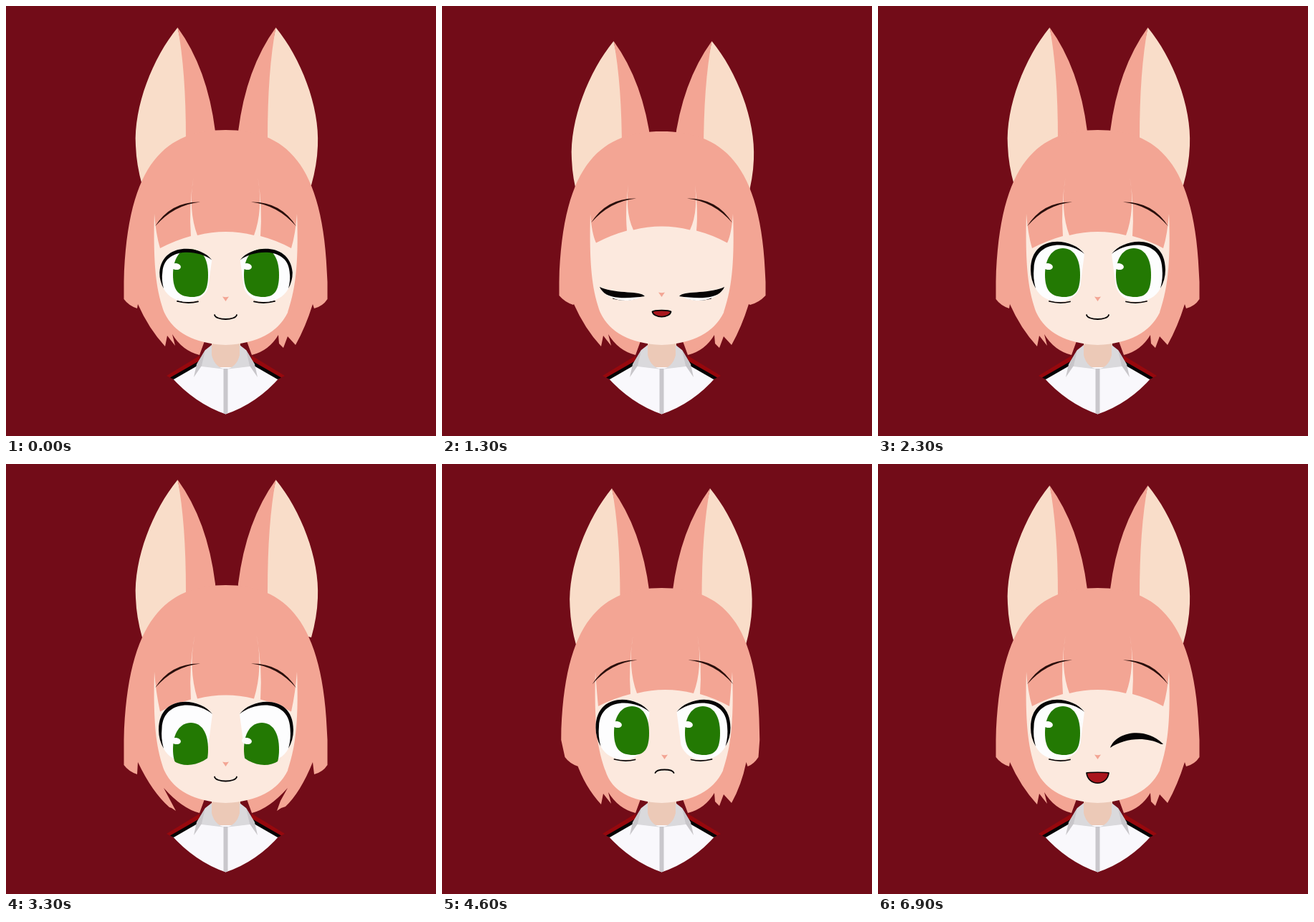
Recreate the animation shown at these times as an HTML page with a canvas. Size 600x600 px, loop 7000 ms.

```html
<!DOCTYPE html>
<html lang="en">
<head>
<meta charset="utf-8">
<title>Eared girl</title>
<style>
html, body { margin: 0; width: 100%; height: 100%; overflow: hidden; background: #720c18; }
canvas { display: block; width: 600px; height: 600px; }
</style>
</head>
<body>
<canvas id="stage" width="600" height="600"></canvas>
<script>
const g = document.getElementById('stage').getContext('2d');
const LOOP = 7000, STEP = 100;
const HAIR = '#f3a594', CREAM = '#f9ddc9', SKIN = '#fce9de', WHITE = '#fdfdfe', BLACK = '#050304';

const mix = (a, b, k) => a + (b - a) * k;
const fill = (d, color) => { g.fillStyle = color; g.fill(new Path2D(d)); };
const line = (d, width, color = BLACK) => {
  g.strokeStyle = color;
  g.lineWidth = width;
  g.lineCap = g.lineJoin = 'round';
  g.stroke(new Path2D(d));
};
const group = draw => { g.save(); draw(); g.restore(); };
const mirror = axis => { g.translate(axis * 2, 0); g.scale(-1, 1); };

// Upper lash outline (start, outer curve, tail, inner curve), then the lower edge of the white
const OPEN = [288,346, 270,322, 213,318, 213,368, 213,382, 220,394, 216,380, 217.5,366,
  219,325, 268,328, 232,418, 272,420, 282,392];
const SHUT = [283,408, 277,400, 245,405, 222,396, 221,395, 220,395, 221,398, 224,401,
  234,413, 262,411, 234,417, 262,418, 280,408];
const WINK = [290,396, 282,374, 242,366, 217,390, 217,390, 216,391, 218,391, 219,391,
  243,379, 272,384, 245,383, 270,385, 290,396];

function pose(t) {
  const ramp = (a, b) => {
    const x = Math.min(1, Math.max(0, (t - a) / (b - a)));
    return x * x * (3 - 2 * x);
  };
  const hold = (a, b, c, d) => ramp(a, b) - ramp(c, d);
  const during = (a, b, f) => t >= a && t < b ? f((t - a) / (b - a)) : 0;
  return {
    pitch: hold(2300, 2800, 3300, 3700) - 2 * hold(1100, 1500, 1900, 2300),
    turn: during(3700, 4900, x => -Math.sin(2 * Math.PI * x)),
    flick: during(0, 1000, x => Math.sin(2 * Math.PI * x) ** 2)
      + during(5100, 5900, x => Math.sin(Math.PI * x) ** 2),
    shut: hold(-60, 200, 250, 450) + hold(1100, 1300, 1950, 2250),
    talk: hold(1150, 1300, 1950, 2200),
    sad: hold(3700, 3850, 5000, 5150),
    wink: ramp(6000, 6300)
  };
}

function ear(dx, dy, angle, shift) {
  g.translate(dx - shift, dy + shift);
  g.translate(236, 190);
  g.rotate(-angle * Math.PI / 180);
  g.translate(-236, -190);
  fill('M239.500 30C205 72 178 140 181 195Q182 222 190 250L265 230V150Z', CREAM);
  fill('M239.500 30Q281 87 292 175L294 215H251V185Q251 90 239.500 30Z', HAIR);
}

function ears({ pitch, turn, flick, sad }) {
  const dy = (pitch < 0 ? -19 : -8) * pitch + 4 * sad;
  group(() => ear(-2.5 * turn, dy, 5.5 * flick, 3 * flick));
  group(() => {
    mirror(308);
    ear(2.5 * turn, dy, 6.8 * flick, 4 * flick);
  });
}

function backHair({ pitch, turn }) {
  const up = Math.max(0, -pitch), down = Math.max(0, pitch);
  const tuck = 7 * Math.abs(turn);
  const top = 173 + 2 * up - 4 * down;
  const left = 164.5 - up, right = 448.5 + 3 * up;
  const lump = 409 + 11 * down - 5 * up;
  const pt = (x, y, x2, y2) => `${mix(x, x2, down)} ${mix(y, y2, down)} `;
  fill(`M306.500 ${top}C225 ${top} ${left + 4.5} 216 ${left + tuck / 4} 385
    L${left + tuck} ${lump}Q${171 + tuck} ${lump + 9} ${183 + tuck} ${lump + 13}L${184 + tuck / 2} 416
    Q${pt(199, 450, 204, 458)} ${pt(222, 475, 228, 479)}L${pt(225, 460, 231, 480)}
    L${pt(236, 474, 237, 484)}L${pt(232, 458, 220, 452)}Q246 481 270 487L278 465H335L343 487
    Q367 481 ${pt(380, 459, 393, 452)}L${pt(381, 471, 383, 470)}L${pt(387, 477, 378, 484)}
    L${pt(393, 461, 384, 480)}L${pt(404, 473, 390, 478)}
    Q${pt(418, 448, 411, 458)} ${428 - tuck / 2} 416
    L${430 - tuck / 2} ${lump + 13}Q${442 - tuck} ${lump + 10} ${right - tuck} ${lump}
    L${right - tuck * .75} 385C${right - 4.5} 216 388 ${top} 306.500 ${top}Z`, HAIR);
}

function shirt() {
  fill('M287 462H327V492L318 512H296L287 492Z', '#ecc9b7');
  fill('M230 517L270 495L288 504H325L344 495L383 517Q350 555 306.500 569.500Q264 555 230 517Z', '#f9f8fc');
  for (const flip of [false, true]) group(() => {
    if (flip) mirror(306.5);
    fill('M224 516L270 488V497L230 519Z', '#97080d');
    fill('M229 518.500L270 495L267 502L234 521Z', BLACK);
    fill('M287 473L278 480L266 500L273 503L306.500 507Q291 504 287 487Z', '#dad9dc');
    fill('M278 480L266 500L262 518L273 502Z', '#c8c6ca');
  });
  fill('M303.500 506H309.500V568L306.500 569.500L303.500 568Z', '#c9c7cc');
}

function face({ pitch, turn }) {
  const l = turn > 0 ? 7 * turn : -turn, r = turn < 0 ? 7 * turn : -turn;
  const y = 7.5 * pitch, s = 5 * turn, c = 3 * turn;
  const inward = 2 * Math.max(0, pitch);
  fill(`M${207 + l} 290Q${209 + l} 318 ${215 + c} ${338 + y}Q${236 + c} ${327 + y} ${258 + s} ${321 + y}
    Q${255 + s} 282 ${261.5 + s + inward} 239Q${254 + s} 285 ${267 + s} ${320 + y}
    Q${306.5 + s} ${310 + y} ${346 + s} ${320 + y}
    Q${359 + s} 285 ${351.5 + s - inward} 239Q${358 + s} 282 ${355 + s} ${321 + y}
    Q${378 + c} ${327 + y} ${398 + c} ${338 + y}Q${404 + r} 318 ${406 + r} 290
    C${409 + r} 370 ${402 + r} 400 ${393 + r} 428Q372 470 306.500 473
    Q241 470 ${221 + l} 428C${211 + l} 400 ${205 + l} 370 ${207 + l} 290Z`, SKIN);
}

function brow() {
  fill('M208 307.500Q234 277.500 271 273.500Q230 272.500 208 307.500Z', '#2a0f0c');
}

// Drawn as the left eye; the right one is flipped, but its iris keeps the same highlight side
function eye(p, flip) {
  const w = flip ? p.wink : 0;
  const v = OPEN.map((a, i) => a + (SHUT[i] - a) * p.shut + (WINK[i] - a) * w);
  const at = (i, n = 1) => v.slice(i * 2, (i + n) * 2).join(' ');
  const outer = `M${at(0)}C${at(1, 3)}Q${at(4, 2)}`;
  const drop = 6 * Math.max(0, p.pitch);
  g.translate(1.5 * p.turn, 3 * p.pitch);
  if (flip) mirror(307);
  if (w < .6) {
    line(`M239 ${412 - p.shut}Q254 ${416 - p.shut} 268 ${412.5 - p.shut}`, 1.8);
    fill(`${outer}C${at(10, 3)}Z`, WHITE);
    group(() => {
      // The iris may pass the inner side of the white, but not the lids
      g.clip(new Path2D(`${outer}C${v[20]} ${v[21] + drop} ${v[22]} ${v[23] + drop} 296 ${v[25]}Z`));
      if (flip) { mirror(307); g.translate(99, 0); }
      g.translate(5.5 * p.turn, 20 * p.pitch);
      fill('M258 338C273 338 282 352 282 375C282 398 275 406 260 406C242 406 233 398 233 375C233 352 243 338 258 338Z', '#237903');
      g.fillStyle = WHITE;
      g.beginPath();
      g.ellipse(237, 363.5, 7, 4.5, .15, 0, 7);
      g.fill();
    });
  }
  fill(`${outer}Q${at(6, 2)}C${at(8, 2)} ${at(0)}Z`, BLACK);
}

function mouth(p) {
  const open = Math.max(p.talk, p.wink);
  g.translate(306.5 + 4 * p.turn, 431 + 5.5 * p.pitch + p.talk);
  const half = 15.5 - 2.5 * Math.max(p.sad, p.talk);
  const curve = mix(8, -6, p.sad);
  if (open < .05) {
    line(`M${-half} 0C${2 - half} ${curve} ${half - 2} ${curve} ${half} 0`, 1.8);
    return;
  }
  const upper = mix(8, p.wink ? -1 : -2.5, open);
  const lower = mix(8, p.wink ? 19 : 9.5, open);
  const d = `M${-half} 0C${3 - half} ${upper} ${half - 3} ${upper} ${half} 0
    C${half - 2} ${lower} ${2 - half} ${lower} ${-half} 0Z`;
  fill(d, '#a9151c');
  line(d, 1.7);
}

function draw() {
  const p = pose(Math.floor(performance.now() % LOOP / STEP) * STEP);
  g.fillStyle = '#720c18';
  g.fillRect(0, 0, 600, 600);
  ears(p);
  backHair(p);
  shirt();
  face(p);
  for (const flip of [false, true]) {
    group(() => eye(p, flip));
    group(() => {
      g.translate(1.5 * p.turn, 5 * p.pitch);
      if (flip) mirror(306.5);
      brow();
    });
  }
  group(() => {
    g.translate(4 * p.turn, (p.pitch > 0 ? 10 : 6) * p.pitch);
    fill('M302 405.500Q306.500 407 311 405.500L306.500 412Z', HAIR);
  });
  group(() => mouth(p));
  requestAnimationFrame(draw);
}
draw();
</script>
</body>
</html>
```
